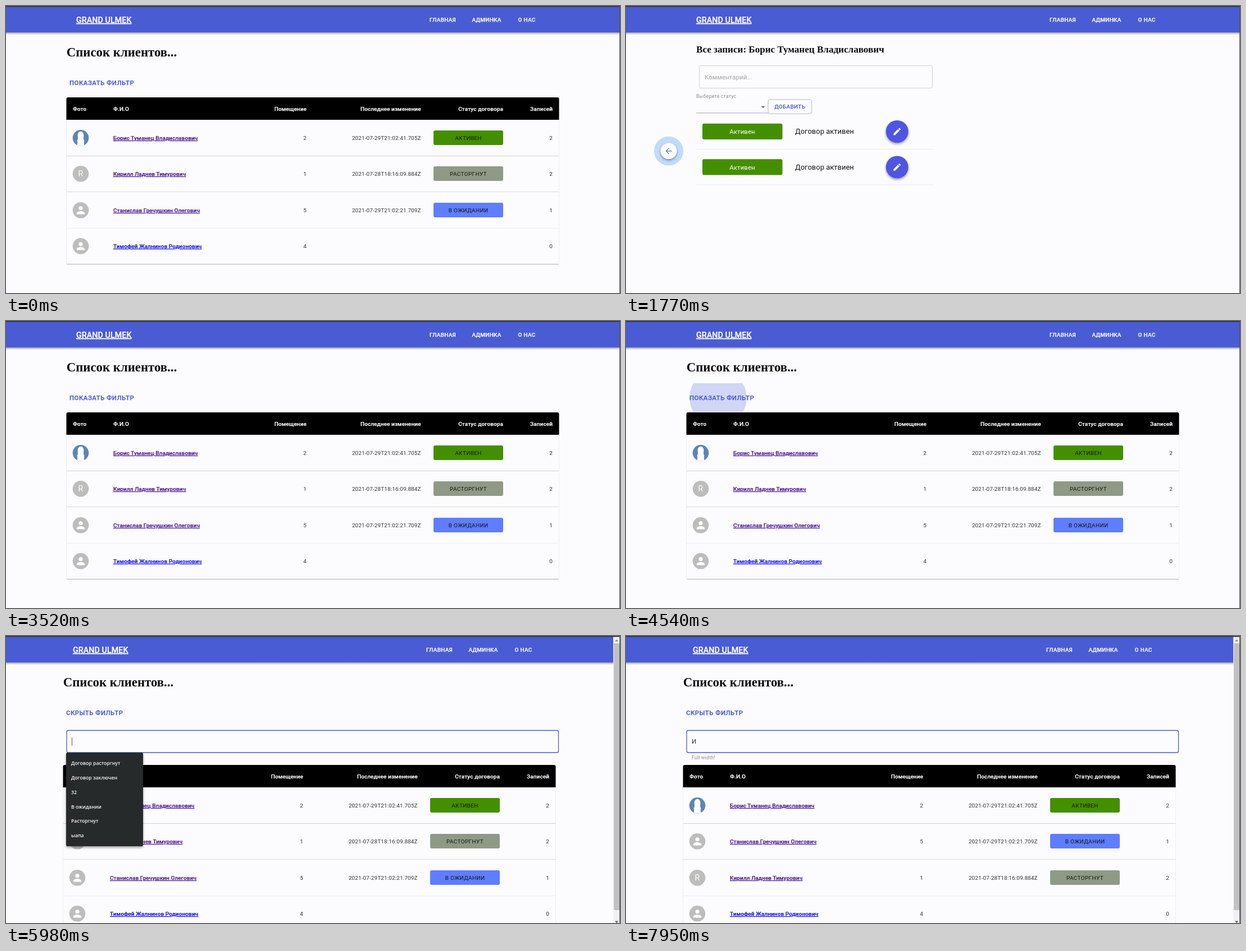
Recreate the animation shown at these times as an HTML page. Size 1093 by 512 pixels, loop 8 s.

```html
<!DOCTYPE html>
<html lang="ru">
<head>
<meta charset="utf-8">
<title>Список клиентов</title>
<style>
  html, body { margin: 0; width: 100%; height: 100%; overflow: hidden; background: #fcfcff; }
  svg { display: block; width: 100%; height: 100%; }
  text { font-family: Roboto, sans-serif; white-space: pre; }
  .cell { font-size: 9.97px; letter-spacing: .107px; fill: #333; }
  .head, .link, .nav, .toggle, .brand { font-weight: 500; fill: currentColor; stroke: currentColor; stroke-width: .25px; }
  .head { font-size: 9.97px; letter-spacing: .107px; color: #fff; }
  .link { font-size: 9.97px; letter-spacing: .107px; text-decoration: underline; }
  .nav { font-size: 9.97px; letter-spacing: .28px; color: #fff; }
  .toggle { font-size: 11.4px; letter-spacing: .5px; color: #4a5bd0; }
  .brand { font-size: 14.24px; letter-spacing: .1px; color: #fff; text-decoration: underline; }
  .button { font-size: 9.97px; letter-spacing: .28px; font-weight: 500; }
  .status { font-size: 9.97px; letter-spacing: .36px; fill: #10160c; }
  .title { font-family: "Liberation Serif", "Times New Roman", serif; font-weight: 700; fill: #0a0a0a; }
  .small { font-size: 8.54px; letter-spacing: .28px; fill: #8b8b90; }
  .input { font-size: 11.4px; letter-spacing: .1px; fill: #333; }
  .option { font: 600 8.7px "Open Sans", sans-serif; fill: #f6f6f6; }
  .url { font: 7.9px "Open Sans", sans-serif; fill: #b9babd; }
</style>
</head>
<body>
<svg id="stage" viewBox="0 0 1093 512">
  <defs>
    <linearGradient id="shade" x2="0" y2="1">
      <stop stop-color="#777a90" stop-opacity=".6"/>
      <stop offset="1" stop-color="#777a90" stop-opacity="0"/>
    </linearGradient>
    <filter id="drop" x="-50%" y="-50%" width="200%" height="200%">
      <feDropShadow dx="0" dy="2.2" stdDeviation="2" flood-opacity=".4"/>
    </filter>
    <clipPath id="toggleClip"><rect id="toggleBox" x="108" y="111" width="126" height="51" rx="3"/></clipPath>
    <clipPath id="avatarClip"><circle r="14.3"/></clipPath>
  </defs>
</svg>
<script>
const stage = document.getElementById('stage');
const toggleBox = document.getElementById('toggleBox');
const LOOP = 8000;
const BLUE = '#4a5cd4', GREEN = '#448f00';

// Moments of the scenario, in ms
const OPEN_NOTES = 760, LEAVE_NOTES = 2150, AVATAR_LOADED = 2420;
const PRESS = 4330, SHOW_FILTER = 4750, FOCUS = 5500, SUGGEST = 5700, TYPE = 6400, SORT = 6850;

function add(parent, tag, attrs = {}, content) {
  const node = document.createElementNS('http://www.w3.org/2000/svg', tag);
  set(node, attrs);
  if (content !== undefined) node.textContent = content;
  parent.appendChild(node);
  return node;
}
function set(node, attrs) {
  for (const key in attrs) node.setAttribute(key, attrs[key]);
}
const move = (node, x, y) => set(node, { transform: `translate(${x} ${y})` });
const group = (parent, x = 0, y = 0) => add(parent, 'g', { transform: `translate(${x} ${y})` });
const rect = (parent, x, y, width, height, fill, extra) =>
  add(parent, 'rect', { x, y, width, height, fill, ...extra });
const circle = (parent, cx, cy, r, fill, extra) => add(parent, 'circle', { cx, cy, r, fill, ...extra });
const label = (parent, cls, x, y, content, extra) => add(parent, 'text', { class: cls, x, y, ...extra }, content);
const icon = (parent, cx, cy, scale, d, fill) =>
  add(parent, 'path', { d, fill, transform: `translate(${cx} ${cy}) scale(${scale}) translate(-12 -12)` });
const show = (node, on) => node.setAttribute('visibility', on ? 'inherit' : 'hidden');
const rowOffset = index => Math.round(index * 64.45);
const END = { 'text-anchor': 'end' }, MIDDLE = { 'text-anchor': 'middle' };

const PERSON = 'M12 12a4 4 0 1 0 0-8 4 4 0 0 0 0 8zm0 2c-2.67 0-8 1.34-8 4v2h16v-2c0-2.66-5.33-4-8-4z';
const PENCIL = 'M3 17.25V21h3.75L17.81 9.94l-3.75-3.75zM20.71 7.04a1 1 0 0 0 0-1.41l-2.34-2.34a1 1 0 0 0-1.41 0l-1.83 1.83 3.75 3.75z';
const ARROW = 'M20 11H7.83l5.59-5.59L12 4l-8 8 8 8 1.41-1.41L7.83 13H20z';

const clients = [
  { name: 'Борис Туманец Владиславович', room: 2, date: '2021-07-29T21:02:41.705Z', status: 'АКТИВЕН', color: GREEN, notes: 2 },
  { name: 'Кирилл Ладнев Тимурович', room: 1, date: '2021-07-28T18:16:09.884Z', status: 'РАСТОРГНУТ', color: '#8f9a86', notes: 2 },
  { name: 'Станислав Гречушкин Олегович', room: 5, date: '2021-07-29T21:02:21.709Z', status: 'В ОЖИДАНИИ', color: '#5f7dff', notes: 1 },
  { name: 'Тимофей Жалнинов Родионович', room: 4, notes: 0 },
];

function drawAvatar(parent, index) {
  const avatar = group(parent, 133, 235.3);
  circle(avatar, 0, 0, 14.3, index ? '#bdbdbb' : '#5c85b5');
  if (index === 0) {
    add(avatar, 'path', {
      d: 'M-7 15Q-5 9-6.500 5Q-4 2-5.500-4Q-5-11.500 0-11.500T5.500-4Q4 2 6.500 5Q5 9 7 15z',
      fill: '#fcfcff', 'clip-path': 'url(#avatarClip)',
    });
  } else if (index === 1) {
    label(avatar, '', 0, 5.1, 'R', { 'font-size': 14.24, fill: '#fff', ...MIDDLE });
  } else {
    icon(avatar, 0, 0, .89, PERSON, '#fff');
  }
  return avatar;
}

function drawRow(parent, client, index) {
  const row = group(parent, 0, rowOffset(index));
  const avatar = drawAvatar(row, index);
  label(row, 'link', 191, 239, client.name, { color: index < 3 ? '#4c1a90' : '#1414e6' });
  label(row, 'cell', 535, 239, client.room, END);
  label(row, 'cell', 973, 239, client.notes, END);
  if (client.status) {
    label(row, 'cell', 738.6, 239, client.date, END);
    rect(row, 761, 222, 124, 26, client.color, { rx: 3 });
    label(row, 'status', 823, 239, client.status, MIDDLE);
  }
  return { row, avatar };
}

// Client list
const list = group(stage);
label(list, 'title', 107.7, 90, 'Список клиентов...', { 'font-size': 22.8 });
const ripple = circle(list, 164, 137, 0, BLUE, { 'clip-path': 'url(#toggleClip)' });
const toggle = label(list, 'toggle', 113, 140.7, '');

const table = group(list);
rect(table, 107.5, 165, 877, 296, 'none', { stroke: '#eeeef3', rx: 3 });
add(table, 'path', { d: 'M107.5 203V166q0-3 3-3H981.500q3 0 3 3V203z', fill: '#000' });
label(table, 'head', 119, 186.6, 'Фото');
label(table, 'head', 191, 186.6, 'Ф.И.О');
[[535, 'Помещение'], [738.6, 'Последнее изменение'], [885, 'Статус договора'], [973, 'Записей']]
  .forEach(([x, content]) => label(table, 'head', x, 186.6, content, END));
['#d2d2d6', '#dadadd', '#ededf4', '#b4b4b8'].forEach((color, i) =>
  rect(table, 108, 267 + rowOffset(i), 876.5, 1, color));
const rows = clients.map((client, i) => drawRow(table, client, i));

// Filter field
const filter = group(stage);
const field = rect(filter, 108, 168.5, 875.5, 39.5, 'none', { rx: 3 });
label(filter, 'small', 117, 219.8, 'Full width!');
const typed = label(filter, 'input', 117, 192.4, 'И');
const caret = rect(filter, 117, 181.5, 1, 14, '#555');
const suggestions = group(filter);
rect(suggestions, 107, 208, 137, 167, '#27292c', { rx: 2.5, filter: 'url(#drop)' });
['Договор расторгнут', 'Договор заключен', '32', 'В ожидании', 'Расторгнут', 'ыапа']
  .forEach((content, i) => label(suggestions, 'option', 116, 230.4 + i * 25.7, content));

// Notes of one client
const notes = group(stage);
label(notes, 'title', 125, 83, 'Все записи: ' + clients[0].name, { 'font-size': 17.1 });
rect(notes, 130.5, 106.5, 415, 40, 'none', { stroke: '#cfcfd3', rx: 3 });
label(notes, 'input', 140, 131, 'Комментарий...', { style: 'fill:#a5a5a8' });
label(notes, 'small', 125, 164.4, 'Выберите статус');
rect(notes, 125, 190.4, 128, 1, '#a3a3c8');
add(notes, 'path', { d: 'M240.500 178.700h7l-3.500 3.600z', fill: '#666' });
rect(notes, 253, 167, 77.500, 25.3, 'none', { stroke: '#b1b4de', rx: 3 });
label(notes, 'button', 291.7, 183.2, 'ДОБАВИТЬ', { fill: '#4753bd', ...MIDDLE });
['Договор активен', 'Договор актвиен'].forEach((content, i) => {
  const note = group(notes, 0, i * 63.5);
  rect(note, 136, 209.7, 142.5, 28.4, GREEN, { rx: 3 });
  label(note, 'input', 207, 228, 'Активен', { style: 'fill:#fff', ...MIDDLE });
  label(note, '', 301, 228.2, content, { 'font-size': 12.8, 'letter-spacing': .1, fill: '#111' });
  circle(note, 482.6, 224, 20, '#5055e2', { filter: 'url(#drop)' });
  icon(note, 482.6, 224, .712, PENCIL, '#fff');
  rect(note, 125, 255, 422, 1, '#ebebf0');
});
const halo = circle(notes, 76, 258.7, 26, '#c2dafc');
circle(notes, 76, 258.7, 14.3, '#fff', { filter: 'url(#drop)' });
icon(notes, 76, 258.7, .712, ARROW, '#5a8bd0');

// App bar and browser chrome
const bar = rect(stage, 0, 0, 1093, 47.5, BLUE);
const barShade = rect(stage, 0, 47.5, 1093, 4, 'url(#shade)');
const barItems = group(stage);
label(barItems, 'brand', 125, 29.8, 'GRAND ULMEK');
[[754, 'ГЛАВНАЯ'], [829.5, 'АДМИНКА'], [911.5, 'О НАС']]
  .forEach(([x, content]) => label(barItems, 'nav', x, 28.2, content));

const scrollbar = group(stage);
rect(scrollbar, 1081, 1, 12, 511, '#f1f1f2');
rect(scrollbar, 1082, 13, 10, 476, '#c1c1c2');
add(scrollbar, 'path', { d: 'M1084 9.500h6l-3-3.500z', fill: '#8a8a8c' });
add(scrollbar, 'path', { d: 'M1084 508.500h6l-3 3.500z', fill: '#505052' });

const statusBar = group(stage);
add(statusBar, 'path', { d: 'M0 501H334q3 0 3 3V512H0z', fill: '#37393d' });
label(statusBar, 'url', 2.5, 511.5,
  'https://deploy-mern-trading-house.herokuapp.com/notes/60e2f6a7eb24c734a8ca8893');
rect(stage, 0, 0, 1093, 1.6, '#30323f');
rect(stage, 1092, 0, 1, 512, '#4b4c58');

const ramp = (t, from, to) => Math.min(1, Math.max(0, (t - from) / (to - from)));
const easeOut = p => 1 - (1 - p) ** 2;

function update(t) {
  const inNotes = t >= OPEN_NOTES && t < LEAVE_NOTES;
  const filtering = t >= SHOW_FILTER;
  const focused = t >= FOCUS;
  const hasText = t >= TYPE;
  const sorted = t >= SORT;
  const shift = filtering ? -6 : 0;

  show(list, !inNotes);
  show(notes, inNotes);
  show(filter, filtering);
  show(scrollbar, filtering);

  const barWidth = filtering ? 1081 : 1093;
  set(bar, { width: barWidth });
  set(barShade, { width: barWidth });
  move(barItems, shift, 0);
  move(list, shift, 0);
  move(table, 0, filtering ? 67 : 0);
  toggle.textContent = filtering ? 'СКРЫТЬ ФИЛЬТР' : 'ПОКАЗАТЬ ФИЛЬТР';
  set(toggleBox, { width: filtering ? 112 : 126 });

  move(rows[1].row, 0, rowOffset(sorted ? 2 : 1));
  move(rows[2].row, 0, rowOffset(sorted ? 1 : 2));
  show(rows[1].avatar, t < LEAVE_NOTES || t >= AVATAR_LOADED);

  set(ripple, {
    r: 82 * easeOut(ramp(t, PRESS, PRESS + 550)),
    opacity: .24 - .17 * ramp(t, 4700, 4880) - .07 * ramp(t, 5160, 5350),
  });
  set(halo, { r: 14 + 12 * easeOut(ramp(t, 1400, 1650)) });

  set(field, { stroke: focused ? '#4a5bd0' : '#c9cad8', 'stroke-width': focused ? 1.3 : 1 });
  show(suggestions, t >= SUGGEST && !hasText);
  show(typed, hasText);
  set(caret, { x: hasText ? 126 : 117 });
  show(caret, focused && (t - (hasText ? TYPE : FOCUS)) % 1000 < 500);

  const hover = ramp(t, 130, 230) - ramp(t, 1250, 1350) + ramp(t, 2170, 2260) - ramp(t, 3350, 3450);
  set(statusBar, { opacity: hover });
}

function frame(now) {
  update(now % LOOP);
  requestAnimationFrame(frame);
}
update(0);
requestAnimationFrame(frame);
</script>
</body>
</html>
```
